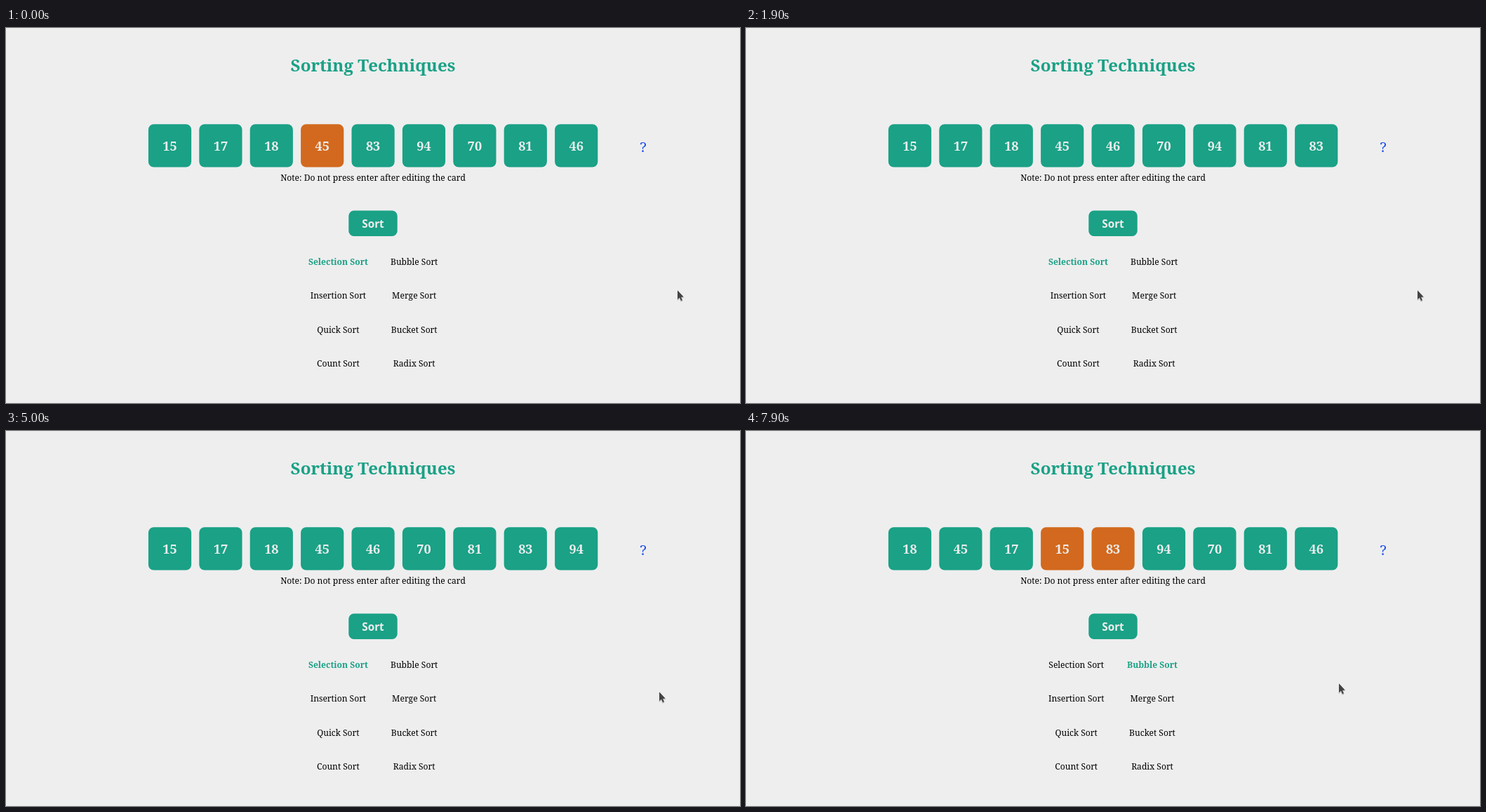
Animation, 1046 px wide and 535 px high, one loop 8000 ms. Source, as an HTML page:

```html
<!DOCTYPE html>
<html lang="en">
<head>
<meta charset="utf-8">
<title>Sorting Techniques</title>
<style>
  html, body { margin: 0; width: 100%; height: 100%; overflow: hidden; background: #eee; }
  svg { display: block; width: 1046px; height: 535px; }
  text { font: 12.1px "Noto Serif", serif; text-anchor: middle; }
  .title { font-size: 24.1px; font-weight: bold; fill: #1aa186; }
  .number { font-size: 18.2px; font-weight: bold; fill: #eee; }
  .button { font: bold 15.3px "Noto Sans", sans-serif; fill: #eee; }
  .help { font-size: 20px; fill: #1a4bea; }
  .chosen { font-weight: bold; fill: #1aa186; }
  .pointer { fill: #434343; stroke: #f8f8f8; stroke-width: .8; stroke-linejoin: round; paint-order: stroke;
    filter: drop-shadow(.5px 1px .6px #0004); }
</style>
</head>
<body>
<svg viewBox="0 0 1046 535">
  <text class="title" x="523" y="62">Sorting Techniques</text>
  <g id="cards"></g>
  <text class="help" x="908" y="177.2">?</text>
  <text x="523" y="217.6">Note: Do not press enter after editing the card</text>
  <rect id="button" x="488.3" y="260.4" width="69.4" height="36.6" rx="7.6"/>
  <text class="button" x="523" y="284.8">Sort</text>
  <g id="menu"></g>
  <g id="cursor" class="pointer">
    <path id="arrow" d="M0 .3V13.3L2.9 10.8 4.9 15.2 7 14.2 5.1 10 8.6 9.4Z"/>
    <path id="hand" d="M0 1.3Q1.2-.6 2.8 1L4.8 6.4 6.3 5.8 8.2 6.4 10 6.5 11.5 8 12.3 12.5 11.8 17.3 4.6 18 1.5 14.3-1.7 11.4Q-1.8 9.5 0 9.6L2.2 10.6Z"/>
  </g>
</svg>
<script>
const LOOP = 8000, RESET = 5200, CHOOSE = 5900;
const GREEN = '#1aa186', ORANGE = '#d2691e', HOVER = '#29b196';
const firstOrder = [15, 17, 18, 45, 83, 94, 70, 81, 46];
const resetOrder = [18, 45, 83, 17, 15, 94, 70, 81, 46];

// highlight on, swap, highlight off, and the two cards
const steps = [
  [0, 0, 100, 3, 3], [600, 1000, 1100, 4, 8], [1300, 1800, 1900, 5, 6],
  [2200, 2700, 2800, 6, 7], [3300, 3500, 3500, 7, 8], [3800, 3800, 4400, 8, 8],
  [6600, 7000, 7100, 2, 3], [7500, 7900, 8000, 3, 4]
];

// time, tip x, tip y, hand shape
const moves = [
  [0, 957, 374], [5000, 931, 372], [5200, 831, 364], [5300, 691, 352],
  [5500, 640, 345], [5600, 602, 340], [5800, 605, 333, 1], [6000, 585, 328, 1],
  [6100, 559, 313], [6300, 536, 286, 1], [6400, 520, 276.5, 1], [6700, 690, 319],
  [6800, 816, 346], [7000, 831, 353], [7100, 840, 358], [7200, 845, 360]
];

const byId = id => document.getElementById(id);
function add(parent, tag, attributes, label = '') {
  const node = document.createElementNS('http://www.w3.org/2000/svg', tag);
  for (const key in attributes) node.setAttribute(key, attributes[key]);
  node.textContent = label;
  return parent.appendChild(node);
}

const cards = firstOrder.map((_, i) => {
  const x = 202.9 + 72.4 * i;
  return {
    box: add(byId('cards'), 'rect', { x, y: 137.3, width: 61.2, height: 61.2, rx: 7.7 }),
    label: add(byId('cards'), 'text', { class: 'number', x: x + 30.6, y: 174.8 })
  };
});
const options = ['Selection', 'Bubble', 'Insertion', 'Merge', 'Quick', 'Bucket', 'Count', 'Radix']
  .map((name, i) => add(byId('menu'), 'text', { y: 337.8 + 48.5 * (i >> 1) }, name + ' Sort'));

function draw(t) {
  const order = [...(t < RESET ? firstOrder : resetOrder)];
  const lit = new Set();
  for (const [on, swap, off, a, b] of steps) {
    if (swap <= t && (t < RESET || swap > RESET)) [order[a], order[b]] = [order[b], order[a]];
    if (on <= t && t < off) lit.add(a).add(b);
  }
  cards.forEach(({ box, label }, i) => {
    box.setAttribute('fill', lit.has(i) ? ORANGE : GREEN);
    label.textContent = order[i];
  });

  const chosen = t < CHOOSE ? 0 : 1;
  options.forEach((option, i) => {
    option.setAttribute('x', (i % 2 ? 581.7 : 473.4) - 2.7 * chosen);
    option.setAttribute('class', i === chosen ? 'chosen' : '');
  });

  byId('button').setAttribute('fill', t >= 6300 && t < 6700 ? HOVER : GREEN);
  const [, x, y, hand] = moves.filter(move => move[0] <= t).pop();
  byId('cursor').setAttribute('transform', `translate(${x} ${y})`);
  byId('arrow').style.display = hand ? 'none' : '';
  byId('hand').style.display = hand ? '' : 'none';
}

const start = performance.now();
function tick() {
  draw((performance.now() - start) % LOOP);
  requestAnimationFrame(tick);
}
tick();
</script>
</body>
</html>
```
